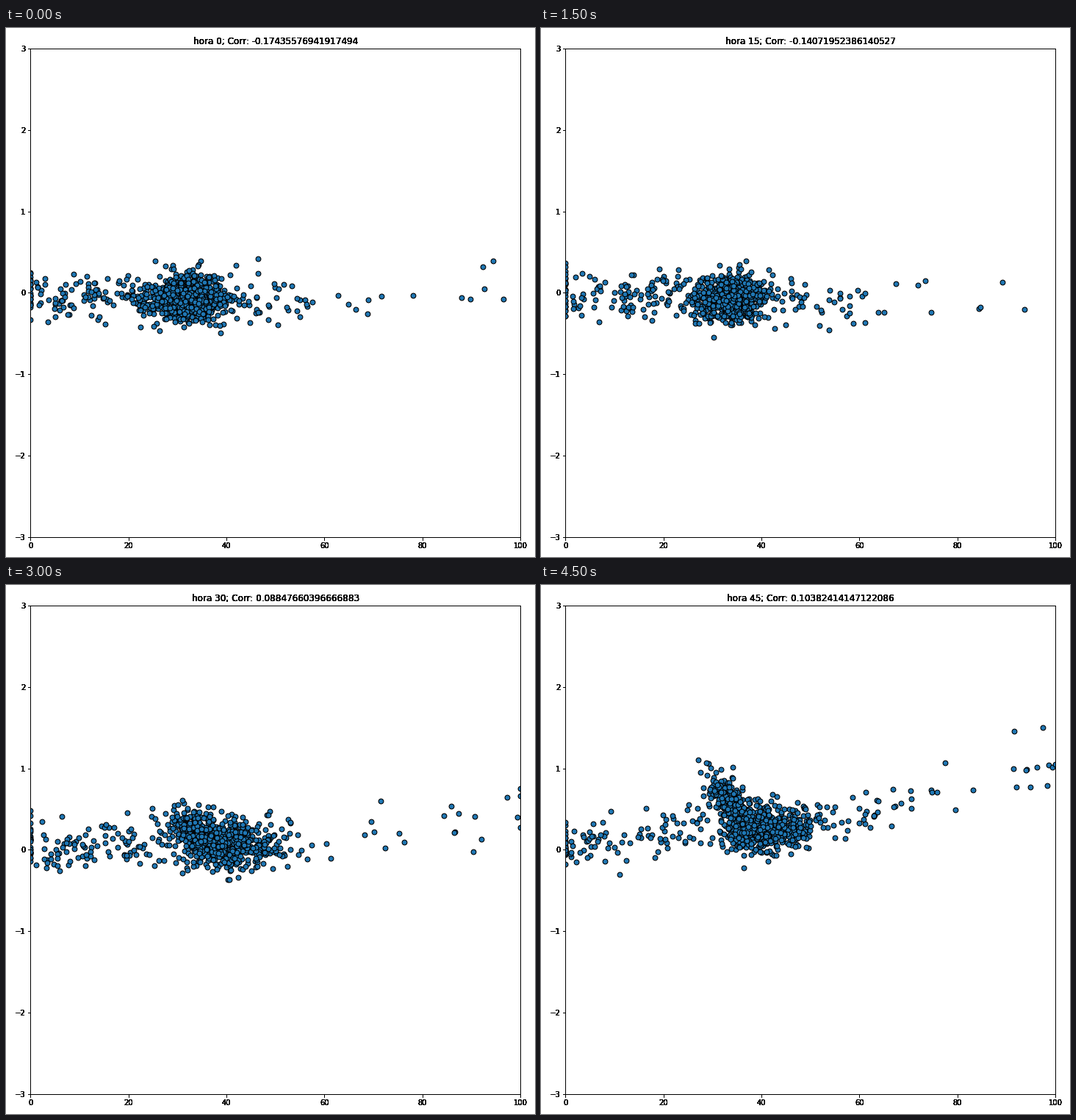
Animation of 720x720 px, one loop 5000 ms. Source, as a matplotlib script:

```python
import numpy as np
import matplotlib.pyplot as plt
from matplotlib.animation import FuncAnimation

plt.rcParams["font.family"] = "DejaVu Sans"
plt.rcParams["axes.linewidth"] = 1
plt.rcParams["xtick.major.width"] = plt.rcParams["ytick.major.width"] = 1

SIZE, DPI = 720, 72
STEP, FRAMES, INTERVAL = 5, 10, 500
LEFT, RIGHT, BOTTOM, TOP = 33.3, 700.2, 27.3, 692.0

CORR = [
    "-0.17435576941917494", "-0.16284107352946183", "-0.15190238976494091",
    "-0.14071952386140527", "-0.13232198622719926", "-0.02416385970241853",
    "0.08847660396666883", "0.07533865343053212", "0.25217195492929584",
    "0.10382414147122086",
]


def ramp(hour, start, length):
    return min(max((hour - start) / length, 0), 1)


def cloud(hour):
    rng = np.random.default_rng(100 + hour)
    rise = ramp(hour, 22, 18)
    ux, uy = 34, -.06 + .6 * rise
    lx, ly = 31 + 10 * ramp(hour, 8, 24), -.07 + .28 * rise

    # upper blob leans to the left as it climbs
    x = rng.normal(ux, 3.1 - .8 * rise, 300)
    upper = x, uy - .05 * rise * (x - ux) + rng.normal(0, .135, x.size)
    lower = rng.normal(lx, 3.7, 330), rng.normal(ly, .135, 330)
    halo = (rng.normal((ux + lx) / 2 + 3 * rise, 7.5, 100),
            rng.normal((uy + ly) / 2, .17, 100))

    x = rng.uniform(1, 28, 120 - hour)
    left = x, rise * .3 * x / 28 - .04 * (1 - rise) + rng.normal(0, .14, x.size)
    zero = np.zeros(26), rng.normal(.02, .14, 26)

    v = rng.random(int(38 + 32 * rise)) ** 2.2
    slope = .2 + .7 * rise
    right = (np.minimum(46 + 56 * v, 100),
             -.18 + .4 * rise + slope * v + rng.normal(0, .13 + .1 * v))

    # a few stragglers above the climbing blob
    stray = rng.normal(26, 2, 3), uy + rise * rng.uniform(.3, .8, 3)

    pts = np.hstack([upper, lower, halo, left, zero, right, stray]).T
    rng.shuffle(pts)
    return pts


fig = plt.figure(figsize=(SIZE / DPI, SIZE / DPI), dpi=DPI, facecolor="white")
box = [v / SIZE for v in (LEFT, BOTTOM, RIGHT - LEFT, TOP - BOTTOM)]

# Stacked axes give the text its heavy, dark edges
layers = [fig.add_axes(box, label=f"layer{i}") for i in range(8)]
for i, ax in enumerate(layers):
    ax.set(xlim=(0, 100), ylim=(-3, 3))
    ax.set_xticks(range(0, 101, 20))
    ax.set_yticks(range(-3, 4))
    ax.patch.set_visible(i == 0)

dots = layers[0].scatter([], [], s=46, c="#1f77b4", edgecolors="black", linewidths=1.1)


def update(i):
    hour = i * STEP
    dots.set_offsets(cloud(hour))
    for ax in layers:
        ax.set_title(f"hora {hour}; Corr: {CORR[i]}", fontsize=12, pad=6)
    return [dots]


anim = FuncAnimation(fig, update, frames=FRAMES, interval=INTERVAL,
                     init_func=lambda: update(0), repeat=True, repeat_delay=0)
plt.show()
```
